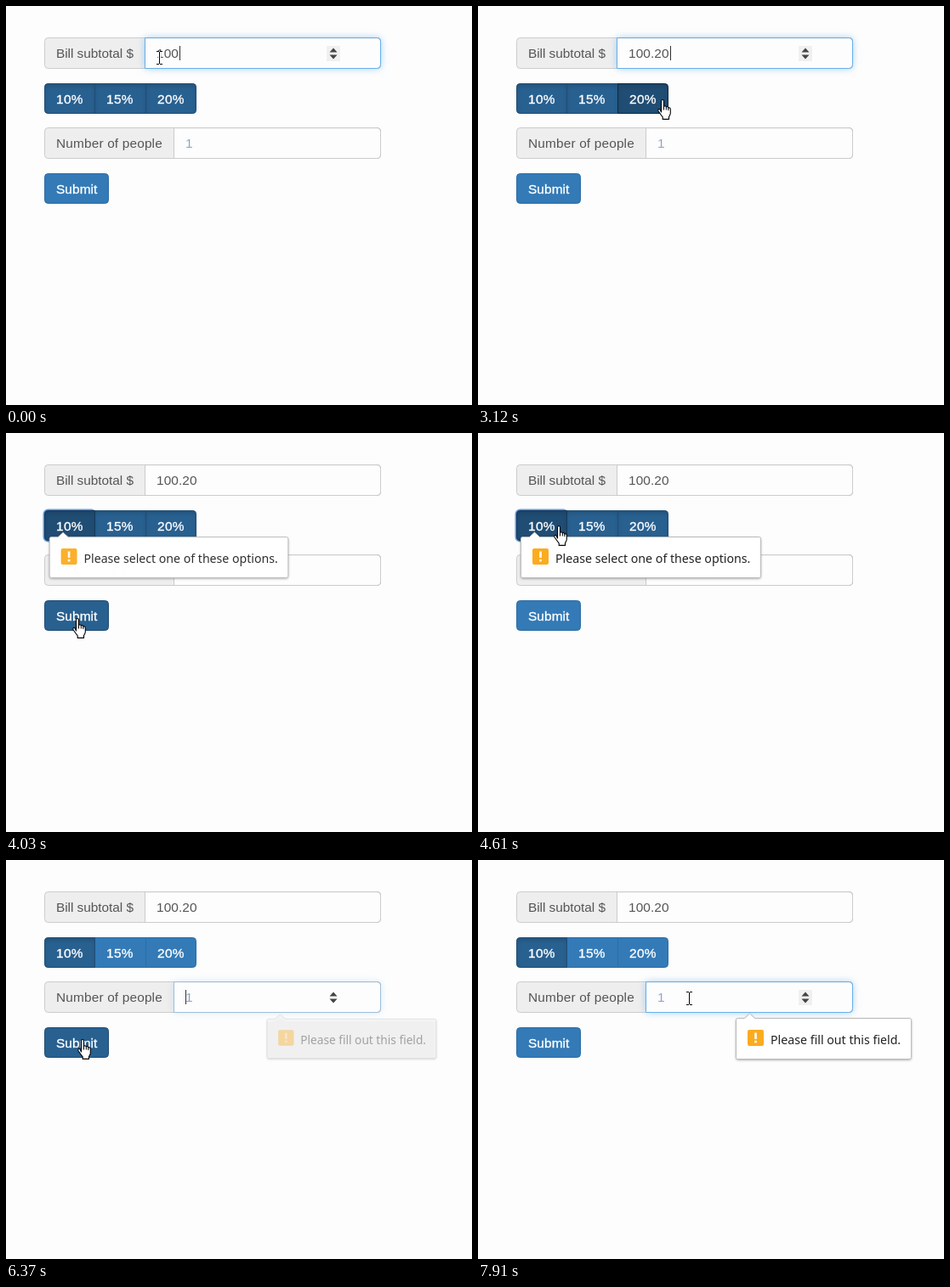
Write an HTML page with a canvas that moves like this. It is 548 px wide and 470 px high and loops after 8 s.

```html
<!DOCTYPE html>
<html lang="en">
<head>
<meta charset="utf-8">
<title>Tip form</title>
<style>
html, body { margin: 0; width: 100%; height: 100%; overflow: hidden; background: #fdfdfd; }
canvas { display: block; width: 548px; height: 470px; }
</style>
</head>
<body>
<canvas id="stage" width="548" height="470"></canvas>
<script>
const g = document.getElementById('stage').getContext('2d');
const LOOP = 8000;
const SANS = 'Arial, "Liberation Sans", sans-serif';
const UI = '"Segoe UI", "Open Sans", "Noto Sans", sans-serif';
const BLUE = '#337ab7', ACTIVE = '#286090', DARK = '#204d74';

// time, shape, left, top
const pointer = [
  [0, 'beam', 177, 53], [2850, 'beam', 203, 53],
  [3000, 'hand', 208, 96], [3120, 'hand', 211, 110], [3250, 'beam', 222, 140],
  [3400, 'arrow', 160, 172], [3520, 'hand', 103, 206], [3650, 'hand', 78, 218],
  [4190, 'hand', 83, 213], [4340, 'arrow', 100, 186], [4490, 'arrow', 97, 150],
  [4610, 'hand', 89, 109], [4890, 'hand', 84, 105],
  [5460, 'hand', 88, 112], [5580, 'arrow', 104, 140], [5700, 'arrow', 112, 172],
  [5820, 'arrow', 107, 202], [5970, 'hand', 101, 204], [6100, 'hand', 91, 210],
  [6220, 'hand', 84, 211], [6640, 'hand', 96, 204], [6790, 'arrow', 160, 178],
  [6920, 'beam', 227, 143], [7070, 'beam', 240, 149], [7220, 'beam', 243, 153],
  [7350, 'beam', 245, 155]
];
const typed = [[0, '100'], [1640, '100.'], [1920, '100.2'], [2040, '100.20']];

const HAND = new Path2D('M4.5 15V2.2Q4.5 .5 6 .5T7.5 2.2V9Q7.8 7.7 9 7.8T10.3 9.3Q10.6 8.4 11.7 8.6' +
  'T12.8 10.2Q13.2 9.5 14.2 9.8T15.3 11.5V16.5Q15 18.5 13.5 20.5V23.4H6.2V20.8Q4.5 18.8 1.2 14' +
  'Q.3 12.3 1.3 11.6T3.4 12.5Z');
const KNUCKLES = new Path2D('M7.5 9V12.5M10.3 9.3V12.5M12.8 10.2V13');
const ARROW = new Path2D('M.5 .5V16.5L4.2 13L6.6 18.5L9 17.5L6.6 12.2H11.8Z');

const last = (list, t) => list.filter(k => k[0] <= t).pop();
const within = (t, a, b) => t >= a && t < b;

function box(x, y, w, h, r) {
  const p = new Path2D();
  p.roundRect(x, y, w, h, r);
  return p;
}

function paint(p, fill, line, width = 1) {
  if (fill) { g.fillStyle = fill; g.fill(p); }
  if (line) { g.strokeStyle = line; g.lineWidth = width; g.stroke(p); }
}

function text(s, x, y, color, font = '15.4px ' + SANS, gap = 0) {
  g.font = font;
  g.letterSpacing = gap + 'px';
  g.fillStyle = color;
  g.fillText(s, x, y);
}

function shadow(color, blur, dy = 0) {
  g.shadowColor = color;
  g.shadowBlur = blur;
  g.shadowOffsetY = dy;
}

function innerShade(p, color, blur, dy) {
  g.save();
  g.clip(p);
  const ring = new Path2D(p);
  ring.rect(0, 0, 548, 470);
  shadow(color, blur, dy);
  g.fillStyle = '#000';
  g.fill(ring, 'evenodd');
  g.restore();
}

function button(x, y, w, radii, label, fill, line) {
  const p = box(x + .5, y + .5, w - 1, 35, radii);
  paint(p, fill);
  if (fill !== BLUE && label !== 'Submit') innerShade(p, 'rgba(0,0,0,.14)', 5.5, 3);
  paint(p, null, line);
  text(label, x + 14, y + 24, '#fff', '15.4px ' + SANS, label === 'Submit' ? .1 : .35);
  g.strokeStyle = '#fff';
  g.lineWidth = .35;
  g.strokeText(label, x + 14, y + 24);
}

function spinner(y, bare) {
  if (!bare) {
    g.fillStyle = '#f0f0f0';
    g.fillRect(377, y - 9, 16, 18);
  }
  paint(new Path2D(`M380.5 ${y - 1.5}h9l-4.5 -5zM380.5 ${y + 1.5}h9l-4.5 5z`), '#444');
}

function field(y, split, label, gap, focus) {
  const left = box(45.5, y + .5, split - 45, 36, [4, 0, 0, 4]);
  const right = box(split + .5, y + .5, 440 - split, 36, [0, 4, 4, 0]);
  paint(left, '#eee', '#ccc');
  text(label, 59, y + 24, '#555', undefined, gap);
  if (focus) {
    g.save();
    shadow(`rgba(102,175,233,${.6 * focus})`, 8);
    paint(right, '#fdfdfd');
    g.restore();
  }
  paint(right, '#fdfdfd');
  innerShade(right, 'rgba(0,0,0,.075)', 1, 1);
  paint(right, null, '#ccc');
  if (focus) {
    g.globalAlpha = focus;
    paint(right, null, '#66afe9');
    g.globalAlpha = 1;
  }
}

function caret(x, y) {
  g.fillStyle = '#333';
  g.fillRect(x, y, 1, 17);
}

function bubble(x, y, w, message, alpha, scale) {
  const h = 48;
  g.save();
  g.globalAlpha = alpha;
  g.translate(x + w / 2, y + h / 2);
  g.scale(scale, scale);
  g.translate(-w / 2, -h / 2);
  const p = new Path2D(`M2 0H10L16 -5.5L22 0H${w - 2}Q${w} 0 ${w} 2V${h - 2}Q${w} ${h} ${w - 2} ${h}` +
    `H2Q0 ${h} 0 ${h - 2}V2Q0 0 2 0Z`);
  g.save();
  shadow('rgba(0,0,0,.4)', 3, 1);
  paint(p, '#fff');
  g.restore();
  paint(p, '#fff', '#bbb');
  paint(box(13.5, 13.5, 19, 19, 2), '#fbab1f');
  g.fillStyle = '#fff';
  g.fillRect(21.7, 17, 2.6, 7.5);
  g.fillRect(21.7, 26.3, 2.6, 2.6);
  text(message, 40.5, 30.5, '#222', '14.2px ' + UI);
  g.restore();
}

function drawPointer([, shape, x, y]) {
  g.save();
  g.translate(x, y);
  g.lineJoin = 'round';
  if (shape === 'hand') {
    paint(HAND, '#fff', '#000', 1.1);
    paint(KNUCKLES, null, '#000');
  } else if (shape === 'arrow') {
    paint(ARROW, '#fff', '#000');
  } else {
    const bars = [[0, 0, 3, 1], [4, 0, 3, 1], [3, 1, 1, 14], [0, 15, 3, 1], [4, 15, 3, 1]];
    g.fillStyle = '#fff';
    g.fillRect(2, 1, 3, 14);
    g.fillStyle = '#000';
    bars.forEach(b => g.fillRect(...b));
  }
  g.restore();
}

function draw(t) {
  g.fillStyle = '#fdfdfd';
  g.fillRect(0, 0, 548, 470);

  // bill row
  const bill = t < 3790 ? 1 : t < 3910 ? .5 : 0;
  const value = last(typed, t)[1];
  field(37, 163, 'Bill subtotal $', -.04, bill);
  text(value, 177, 61, '#555', undefined, .1);
  if (t < 3790) {
    spinner(56);
    const off = within(t, 400, 930) || within(t, 1490, 1640) || within(t, 2600, 3120);
    const x = 204 + [0, 4, 13, 22][value.length - 3];
    if (!off) caret(x, 47);
  }

  // tip choices
  const chosen = t >= 5190;
  const rest = chosen ? BLUE : ACTIVE;
  const restLine = chosen ? '#2e6da4' : DARK;
  const ringed = within(t, 3910, 6370);
  const over20 = within(t, 3000, 3250);
  if (ringed) paint(box(44.5, 90.5, 61, 37, 5), null, '#5e9ae8', 2);
  button(104, 91, 61, 0, '15%', rest, restLine);
  button(164, 91, 60, [0, 4, 4, 0], '20%', over20 ? DARK : rest, over20 ? '#122b40' : restLine);
  button(45, 91, 60, [4, 0, 0, 4], '10%', ringed ? DARK : ACTIVE, ringed ? '#173a58' : DARK);

  // people row
  const people = t < 6370 ? 0 : t < 6490 ? .45 : 1;
  field(143, 197, 'Number of people', .16, people);
  text('1', 211, 167, '#8fa5c6');
  if (people) {
    spinner(162, t < 6920);
    if (t < 7910) caret(211, 153);
  }

  const pressed = within(t, 3790, 3910);
  const hover = within(t, 3520, 4340) || within(t, 5970, 6790);
  button(45, 197, 76, 4, 'Submit', pressed ? DARK : hover ? ACTIVE : BLUE,
    pressed ? '#122b40' : hover ? DARK : '#2e6da4');

  // validation bubbles
  if (within(t, 3910, 5040)) {
    const a = t < 4030 ? .4 : t < 4190 ? .94 : 1;
    bubble(50.5, 122.5, 282, 'Please select one of these options.', a, t < 4030 ? .965 : t < 4190 ? .995 : 1);
  }
  if (t >= 6370) {
    const a = t < 6490 ? .38 : t < 6640 ? .94 : 1;
    bubble(303.5, 186.5, 206, 'Please fill out this field.', a, t < 6490 ? .965 : t < 6640 ? .995 : 1);
  }

  drawPointer(last(pointer, t));
}

const start = performance.now();
function tick() {
  draw((performance.now() - start) % LOOP);
  requestAnimationFrame(tick);
}
tick();
</script>
</body>
</html>
```
